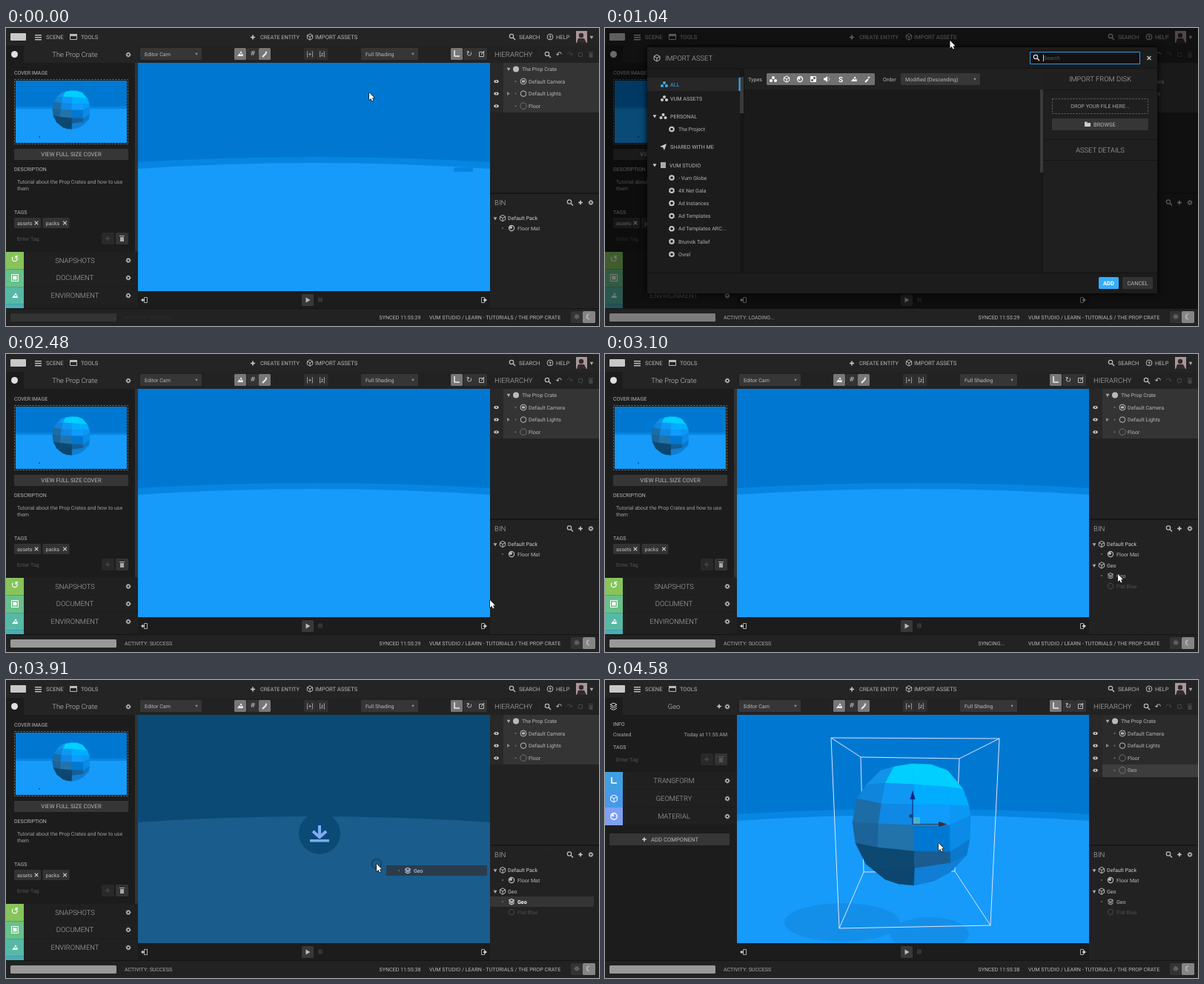
An HTML page with a canvas that plays this animation: 800 by 402 pixels, repeating every 5580 ms.

```html
<!DOCTYPE html>
<html lang="en">
<head>
<meta charset="utf-8">
<title>Scene editor</title>
<style>
html, body { margin: 0; width: 100%; height: 100%; overflow: hidden; background: #1c1c1c }
canvas { display: block }
</style>
</head>
<body>
<canvas id="stage" width="800" height="402"></canvas>
<script>
const g = document.getElementById('stage').getContext('2d');
const LOOP = 5580, TITLE = 'The Prop Crate';

// ---- drawing helpers ----
function rect(x, y, w, h, c) { g.fillStyle = c; g.fillRect(x, y, w, h); }
function round(x, y, w, h, c, r = 1.5) {
  g.fillStyle = c; g.beginPath(); g.roundRect(x, y, w, h, r); g.fill();
}
function box(x, y, w, h, c, dash = []) {
  g.strokeStyle = c; g.lineWidth = 1; g.setLineDash(dash);
  g.strokeRect(x + .5, y + .5, w - 1, h - 1); g.setLineDash([]);
}
function disc(x, y, r, c) { g.fillStyle = c; g.beginPath(); g.arc(x, y, r, 0, 7); g.fill(); }
function ring(x, y, r, c, w = 1) {
  g.strokeStyle = c; g.lineWidth = w; g.beginPath(); g.arc(x, y, r, 0, 7); g.stroke();
}
function trace(p) {
  g.beginPath();
  for (let i = 0; i < p.length; i += 2) g.lineTo(p[i], p[i + 1]);
}
function fill(p, c) { trace(p); g.fillStyle = c; g.fill(); }
function line(p, c, w = 1) { trace(p); g.strokeStyle = c; g.lineWidth = w; g.stroke(); }
function text(s, x, y, size = 7.1, c = '#b8b8b8', align = 'left', weight = 400) {
  g.font = `${weight} ${size}px Roboto, sans-serif`;
  g.textAlign = align; g.textBaseline = 'alphabetic'; g.fillStyle = c;
  g.fillText(s, x, y + size * .36);
}
function glyph(s, x, y, size = 8, c = '#c4c4c4') {
  g.font = `${size}px "DejaVu Sans", sans-serif`;
  g.textAlign = 'center'; g.textBaseline = 'middle'; g.fillStyle = c;
  g.fillText(s, x, y);
}
function plus(x, y, r = 3, c = '#ccc') {
  line([x - r, y, x + r, y], c, 1.6); line([x, y - r, x, y + r], c, 1.6);
}
function cross(x, y, r = 2.3, c = '#ccc') {
  line([x - r, y - r, x + r, y + r], c, 1.2); line([x - r, y + r, x + r, y - r], c, 1.2);
}
function lens(x, y, c = '#bbb') { ring(x - 1, y - 1, 2.7, c, 1.2); line([x + 1, y + 1, x + 4, y + 4], c, 1.4); }
function gear(x, y) { ring(x, y, 2, '#bbb', 1.4); g.setLineDash([1, 1.2]); ring(x, y, 3, '#bbb'); g.setLineDash([]); }
function down(x, y, c = '#aaa', r = 2.4) { fill([x - r, y - r * .7, x + r, y - r * .7, x, y + r], c); }
function trash(x, y, c) { rect(x - 2.5, y - 2, 5, 6, c); rect(x - 3.5, y - 4, 7, 1, c); }
function cube(x, y, c = '#bbb', r = 4.2) {
  const k = r * .87, h = r / 2;
  line([x, y - r, x + k, y - h, x + k, y + h, x, y + r, x - k, y + h, x - k, y - h, x, y - r], c);
  line([x - k, y - h, x, y, x + k, y - h], c); line([x, y, x, y + r], c);
}
function layers(x, y, c = '#bbb', r = 3.6) {
  line([x, y - r, x + r, y - r / 2, x, y, x - r, y - r / 2, x, y - r], c);
  for (const d of [0, r * .6]) line([x - r, y + d, x, y + r / 2 + d, x + r, y + d], c);
}
function folder(x, y, c = '#ccc') { rect(x - 4, y - 2, 8, 5, c); rect(x - 4, y - 3.5, 3.5, 2, c); }
function image(x, y, c = '#eee') { fill([x - 4, y + 3, x - 1, y - 1, x + 1, y + 1, x + 3, y - 1, x + 4, y + 3], c); disc(x + 1, y - 2, 1.2, c); }
function people(x, y, c = '#ccc') { for (const d of [-3, 0, 3]) disc(x + d, y + (d ? 2 : -2), 2, c); }
function select(s, x, w, y) {
  round(x, y, w, 16, '#363636'); text(s, x + 6, y + 8); down(x + w - 7, y + 8, '#999', 1.7);
}

// ---- 3D scene ----
const RINGS = [
  [372, 122, 390, 117, 414, 113, 440, 114, 462, 122],
  [352, 142, 378, 139, 418, 141, 460, 144, 483, 147],
  [340, 160, 373, 167, 417, 168, 466, 169, 491, 170],
  [334, 192, 369, 194, 416, 196, 465, 196, 493, 183],
  [338, 220, 368, 226, 417, 231, 466, 232, 492, 215],
  [352, 248, 374, 254, 418, 254, 466, 247, 488, 236],
  [378, 269, 396, 275, 417, 277, 444, 271, 466, 259]];
const FACETS = [
  '#1193ec', '#00cfff', '#00cfff', '#00cfff', '#0f86dc', '#1097f4', '#00adff', '#00adff',
  '#1d6ca6', '#0f88e6', '#0f9cfc', '#0d97f5', '#1b6399', '#2273a9', '#0078d2', '#0b8ae8',
  '#0d4871', '#0d4871', '#1a5c8f', '#0a78cc', '#0c466e', '#0c466e', '#0f7ed4', '#0f7ed4'];
function sphere(cx, cy, s) {
  const at = (r, c) => [cx + (RINGS[r][2 * c] - 414) * s, cy + (RINGS[r][2 * c + 1] - 195) * s];
  FACETS.forEach((c, i) => {
    const r = i >> 2, k = i % 4;
    const quad = [...at(r, k), ...at(r, k + 1), ...at(r + 1, k + 1), ...at(r + 1, k)];
    fill(quad, c); g.lineJoin = 'round'; line([...quad, quad[0], quad[1]], c, .6);
  });
}
function ground(edge, mid, c) {
  g.fillStyle = c; g.beginPath(); g.moveTo(178, edge);
  g.quadraticCurveTo(415, 2 * mid - edge, 653, edge);
  g.lineTo(653, 355); g.lineTo(178, 355); g.fill();
}
function shadow(x, y, rx, ry) {
  g.fillStyle = '#148fe9'; g.beginPath(); g.ellipse(x, y, rx, ry, 0, 0, 7); g.fill();
}
function viewport(t) {
  g.save(); g.beginPath(); g.rect(178, 47, 475, 308); g.clip();
  if (t >= 3910 && t < 4460) {
    rect(178, 47, 475, 308, '#0b4a74'); ground(192, 184, '#1a5c8c');
    disc(423, 207, 28, '#0b4a74');
    const c = '#7fabf5';
    line([423, 196, 423, 211], c, 4); line([414, 204, 423, 212, 432, 204], c, 4);
    rect(410, 215, 26, 3.5, c);
  } else {
    rect(178, 47, 475, 308, '#0078d2'); ground(181, 174, '#0686e2'); ground(190, 182, '#169bfa');
    if (t < 1040) rect(604, 188, 26, 6, '#0686e2');
    if (t >= 4580) geosphere();
  }
  g.restore();
}
function geosphere() {
  shadow(320, 327, 78, 26); shadow(438, 343, 53, 23);
  const front = [305, 78, 532, 79, 520, 331, 316, 335], back = [345, 104, 478, 106, 472, 258, 349, 259];
  const c = '#dfe4ff';
  line([...back, 345, 104], c);
  sphere(414, 195, 1);
  line([...front, 305, 78], c);
  for (let i = 0; i < 8; i += 2) line([front[i], front[i + 1], back[i], back[i + 1]], c);
  line([415, 194, 415, 158], '#14348c', 1.2); fill([415, 149, 411.5, 161, 418.5, 161], '#12277e');
  line([415, 194.5, 452, 194.5], '#4a2f35', 1.2); fill([462, 194.5, 450, 191, 450, 198], '#472a2b');
  rect(416, 185, 9, 9, '#4bb4c8'); disc(413, 183.5, 2.5, '#173f66');
}

// ---- editor chrome ----
function header(t) {
  rect(0, 0, 800, 24, '#242424');
  round(6, 7, 21, 10, '#c8c8c8', 1);
  for (const y of [9, 12, 15]) rect(39, y, 9, 1.4, '#c4c4c4');
  text('SCENE', 54, 12.5, 7.6);
  box(86, 8, 10, 8, '#bbb'); rect(86, 8, 10, 3, '#bbb'); text('TOOLS', 101, 12.5, 7.5);
  plus(333, 12.5); text('CREATE ENTITY', 343, 12.5, 7.4);
  const hot = t >= 770 && t < 1040 ? '#fff' : '#b8b8b8';
  cube(410, 12, hot); text('IMPORT ASSETS', 417, 12.5, 7.7, hot);
  lens(683, 12); text('SEARCH', 692, 12.5, 7.5);
  ring(734, 12, 3.9, '#bbb'); text('?', 734, 12.3, 6.5, '#ddd', 'center', 700);
  text('HELP', 742, 12.5, 7.5);
  rect(769, 4, 15, 16, '#a9979a'); disc(776, 10, 3.2, '#322a2c'); fill([770, 20, 772, 14, 780, 14, 783, 20], '#322a2c');
  down(790, 12.5, '#aaa');
}
function toolbar() {
  rect(178, 24, 475, 23, '#222');
  select('Editor Cam', 181, 83, 27); select('Full Shading', 479, 77, 27);
  for (const [x, c] of [[308, '#777'], [325, '#333'], [341, '#777'], [402, '#303030'], [418.5, '#303030'],
    [600, '#777'], [617, '#333'], [633, '#333']]) round(x, 27, 16, 16, c);
  image(316, 35); glyph('#', 333, 35, 9);
  line([346, 39, 351, 34], '#eee', 2); glyph('✦', 351, 33, 6, '#eee');
  text('[+]', 410, 35, 8, '#bbb', 'center'); text('[z]', 426.5, 35, 8, '#bbb', 'center');
  line([605, 30, 605, 38, 612, 38], '#eee', 1.5); glyph('↻', 625, 35, 10);
  box(638, 32, 7, 7, '#bbb'); line([641, 36, 645, 31], '#ccc');
}
function section(s, y) {
  rect(24, y - 12, 154, 23, '#202020'); text(s, 93, y, 9.4, '#b0b0b0', 'center', 300); gear(165, y);
}
function panelHead(s) {
  rect(0, 24, 178, 354, '#1c1c1c'); rect(24, 24, 154, 23, '#242424');
  text(s, 93, 36, 9.4, '#c8c8c8', 'center', 300);
  gear(165, 36);
}
function tagInput(y) {
  text('Enter Tag', 15, y, 7.1, '#555');
  round(129, y - 8, 17, 16, '#292929'); round(148, y - 8, 17, 16, '#333');
  plus(137, y, 3, '#444');
}
function chip(s, x, y, w) {
  round(x, y - 7, w, 14, '#333'); text(s, x + 4, y, 7, '#c0c0c0'); cross(x + w - 6, y);
}
function packPanel() {
  panelHead(TITLE);
  disc(11.5, 35.5, 4.5, '#e0e0e0');
  text('COVER IMAGE', 11, 60, 7);
  box(11, 69, 154, 88, '#777', [2, 2]);
  rect(13, 71, 150, 84, '#0078d2'); rect(13, 106, 150, 4, '#0686e2'); rect(13, 109, 150, 46, '#169bfa');
  sphere(88, 110.5, .315); rect(44, 146, 2, 2, '#0864ae');
  round(11, 163, 154, 15, '#363636'); text('VIEW FULL SIZE COVER', 88, 170.5, 7.7, '#b8b8b8', 'center');
  text('DESCRIPTION', 11, 190, 7);
  text('Tutorial about the Prop Crates and how to use', 15, 207.5, 7, '#a0a0a0');
  text('them', 15, 216, 7, '#a0a0a0');
  text('TAGS', 11, 248, 7);
  chip('assets', 11, 263, 36); chip('packs', 49.5, 263, 36);
  tagInput(284); trash(156.5, 284, '#aaa');
  rect(174, 47, 4, 331, '#151515'); rect(174, 47, 4, 262, '#333');
  section('SNAPSHOTS', 313.5); section('DOCUMENT', 337); section('ENVIRONMENT', 361); rect(24, 372, 154, 6, '#202020');
  ['#87c45c', '#68c08a', '#56b9a5', '#48aebc'].forEach((c, i) => rect(0, 302 + i * 23.6, 24, i < 3 ? 23.6 : 5.2, c));
  glyph('↺', 12, 313, 13, '#fff'); box(7, 332, 10, 10, '#fff'); rect(9.5, 334.5, 5, 5, '#fff'); image(12, 361, '#fff');
}
function geoPanel() {
  panelHead('Geo'); plus(154, 35.5, 2.8); layers(11.5, 35.5, '#ddd', 4.5);
  text('INFO', 11, 59, 7);
  text('Created', 11, 73, 7, '#a8a8a8'); text('Today at 11:55 AM', 165, 73, 7, '#a8a8a8', 'right');
  text('TAGS', 11, 90, 7); tagInput(107); trash(156.5, 107, '#555');
  section('TRANSFORM', 136); section('GEOMETRY', 160); section('MATERIAL', 184);
  ['#419fe0', '#4799e8', '#7f9ff2'].forEach((c, i) => rect(0, 124 + i * 24, 24, 24, c));
  line([9, 131, 9, 139, 16, 139], '#fff', 1.6); cube(12, 160, '#fff', 5); ring(12, 184, 4.2, '#fff', 1.4); disc(10.5, 182.5, 1.5, '#fff');
  round(6, 207, 162, 16, '#363636'); plus(53, 215, 2.8); text('ADD COMPONENT', 62, 215, 7.7);
}
function hierarchy(t) {
  rect(653, 24, 147, 200, '#222');
  text('HIERARCHY', 659, 36, 9.6, '#b8b8b8', 'left', 300);
  lens(731, 36); glyph('↶', 746, 36, 10); glyph('↷', 761, 36, 10, '#444');
  box(772, 33, 6, 6, '#444'); trash(789, 36, '#444');
  const done = t >= 4580;
  rect(653, 47, 18, done ? 84 : 67, '#282828'); rect(671, 47, 129, 67, done ? '#2b2b2b' : '#343434');
  if (done) rect(671, 114, 129, 17, '#3d3d3d');
  down(678, 55.5); disc(688, 55.5, 4, '#bbb'); text(TITLE, 696, 55.5);
  const rows = ['Default Camera', 'Default Lights', 'Floor'];
  if (done) rows.push('Geo');
  rows.forEach((s, i) => {
    const y = 72 + i * 16.6;
    g.fillStyle = '#ccc'; g.beginPath(); g.ellipse(661.5, y, 3.2, 2, 0, 0, 7); g.fill(); disc(661.5, y, 1, '#222');
    disc(687.5, y, 1, '#777'); text(s, 705, y);
    if (i) (i < 2 ? ring : layers)(698, y, i < 2 ? 3.8 : '#bbb', '#bbb');
    else { ring(698, y, 4, '#bbb'); rect(696, y - 1.5, 4, 3, '#bbb'); }
    if (i > 1) ring(698, y, 4.3, '#888', .7);
  });
  fill([676, 86, 676, 91, 680, 88.6], '#888');
}
function geoRow(x, y, c) {
  disc(x + 17, y, .9, '#777'); layers(x + 29, y, c); text('Geo', x + 37, y, 7.1, c, 'left', c === '#fff' ? 700 : 400);
}
function bin(t) {
  rect(653, 224, 147, 154, '#222'); rect(653, 222, 147, 2, '#171717');
  text('· · ·', 727, 228, 6, '#666', 'center');
  text('BIN', 659, 236, 9.6, '#b8b8b8', 'left', 300);
  lens(761, 235.5); plus(775, 235.5, 2.8); gear(789, 235.5);
  const material = y => { ring(682, y, 3.6, '#bbb', 1.2); disc(681, y - 1, 2, '#bbb'); };
  down(660, 257); cube(670, 256.5); text('Default Pack', 677, 256.5, 7.1, '#d0d0d0');
  disc(670, 270, .9, '#777'); material(270); text('Floor Mat', 690, 270);
  if (t < 2740) return;
  const drag = t >= 3640 && t < 3910;
  if (drag) rect(653, 278, 140, 43, '#343434');
  else if (t >= 3370 && t < 4460) rect(653, 292, 140, 14, '#353535');
  down(660, 285.5); cube(670, 285, drag ? '#777' : '#bbb'); text('Geo', 677, 285, 7.1, drag ? '#888' : '#c8c8c8');
  geoRow(653, 299, t >= 3370 && t < 4460 ? '#fff' : '#bbb');
  ring(682, 313, 3.6, '#444', 1.2); text('Flat Blue', 690, 313, 7.1, '#505050');
}
function footer(t) {
  rect(0, 379, 800, 23, '#222'); rect(0, 378, 800, 1, '#141414');
  round(6, 385, 143, 11, t < 1040 ? '#333' : t < 1160 ? '#7c7c7c' : '#999');
  const status = t < 1040 || t >= 1160 ? 'SUCCESS' : 'LOADING...';
  text('ACTIVITY: ' + status, 160, 390.5, 7.1, t < 1040 ? '#303030' : '#aaa');
  const sync = t < 2980 ? 'SYNCED 11:55:29' : t < 3250 ? 'SYNCING...' : 'SYNCED 11:55:38';
  text(sync, 503.5, 390.5);
  text('VUM STUDIO / LEARN - TUTORIALS / ' + TITLE.toUpperCase(), 571, 390.5, 7.2);
  round(762, 382, 16, 16, '#333'); round(778, 382, 17, 16, '#858585');
  glyph('☼', 770, 390, 10); glyph('☾', 786.5, 390, 10, '#fff');
}
function playbar() {
  rect(178, 355, 475, 23, '#1c1c1c');
  round(399, 359, 16, 16, '#383838'); fill([404.5, 363.5, 404.5, 370.5, 410.5, 367], '#bbb');
  rect(421, 363.5, 6, 6, '#343434');
  for (const [x, d] of [[187, -1], [644, 1]]) {
    box(x - 2 - d, 363, 5, 8, '#aaa'); line([x, 367, x + 4 * d, 367], '#ddd', 1.5);
    fill([x + 2 * d, 364.5, x + 5 * d, 367, x + 2 * d, 369.5], '#ccc');
  }
}

// ---- import dialog ----
const FIRST = ['- Vum Globe', '4X Net Gala', 'Ad Instances', 'Ad Templates', 'Ad Templates ARC...', 'Brunvik Tallef', 'Ovrel'];
const LATER = ['LEARN - Intro', 'LEARN - Tutorials', 'Tib Norvas', 'Bor Zep', 'Torvil Making Sk...', 'Velka - Ordrum',
  'Tinystall: The dRU...', 'Druffin', 'VALLEYS of T...', 'Dr Umber', 'Meadow Prop Set', 'Dagrunor 31', 'QVD',
  'Client Trials (Lo...', 'PRINTSCREENS 1...'];
function listItem(s, y, c = '#b0b0b0') { ring(90, y, 2.8, c === '#b0b0b0' ? '#c8c8c8' : c, 2); text(s, 99, y, 7.1, c); }
function activeRow(y) { rect(57, y - 9, 125, 18, '#272727'); rect(180.5, y - 9, 2, 18, '#35aefc'); }
function sidebar(scrolled) {
  const blue = '#38aefc';
  rect(182, 54, 5, 276, '#171717');
  if (scrolled) {
    rect(182, 180, 5, 48, '#3a3a3a'); activeRow(91);
    LATER.forEach((s, i) => listItem(s, 73.7 + i * 17.18, i === 1 ? blue : undefined));
    return;
  }
  rect(182, 66, 5, 49, '#3a3a3a'); activeRow(76);
  people(80, 76, blue); text('ALL', 88, 76.5, 7.2, blue);
  people(80, 95); text('VUM ASSETS', 88, 95.5, 7.2);
  down(67, 119, '#ccc'); people(78.5, 119); text('PERSONAL', 88, 119.5, 7.2);
  listItem('The Project', 136.5);
  fill([74, 160, 83, 156, 80, 165, 78, 161], '#ccc'); text('SHARED WITH ME', 88, 160.5, 7.2);
  down(67, 185, '#ccc'); rect(75, 181, 7, 8, '#aaa'); text('VUM STUDIO', 87, 185, 7.2);
  FIRST.forEach((s, i) => listItem(s, 202 + i * 17.2));
}
function tile(x, name, picked, paint) {
  paint();
  rect(x, 132, 71, 20.5, picked ? '#36b1fb' : '#2a2a2a');
  text(name, x + 35.5, 143.5, 7.2, picked ? '#fff' : '#aaa', 'center', picked ? 700 : 400);
  rect(x + 54, 93, 17, 17, '#7f9df3'); cube(x + 62.5, 101.5, '#fff', 4.5);
}
function assets(picked) {
  tile(196, 'GEO', picked, () => {
    rect(196, 92, 71, 40, '#0078d2'); rect(196, 114, 71, 18, '#169bfa'); sphere(231, 113.5, .15);
  });
  tile(273.5, 'RAYCASTVEHI', false, () => {
    rect(273.5, 92, 71, 40, '#4b4b4b'); rect(273.5, 108, 71, 24, '#777');
    fill([292, 124, 300, 112, 326, 118, 320, 132, 300, 132], '#999');
    fill([296, 117, 303, 112, 322, 107, 326, 113, 308, 124], '#69a85e');
    for (const [x, y] of [[299, 121], [309, 125], [322, 117], [307, 110]]) disc(x, y, 2.5, '#222');
    fill([308, 113, 315, 111, 316, 116, 310, 118], '#d7e6c8');
  });
}
function details() {
  text('NAME', 603, 195, 7.1); rect(603, 201, 126, 14, '#131313'); text('Geo', 606.5, 208, 7, '#aaa');
  text('DESCRIPTION', 603, 226, 7.1); rect(603, 231, 126, 59, '#131313'); text('A geosphere', 606.5, 238.5, 7, '#aaa');
  text('TAGS', 603, 300, 7.1); chip('geosphere', 603, 313.5, 48);
  rect(603, 326, 88, 4, '#131313'); rect(693, 326, 16, 4, '#333'); rect(712, 326, 17, 4, '#333');
  rect(740, 178, 5, 152, '#171717'); rect(740, 178, 5, 72, '#3a3a3a');
}
function dialog(t) {
  rect(0, 0, 800, 378, 'rgba(0,0,0,.52)');
  g.save(); g.shadowColor = '#000'; g.shadowBlur = 8; rect(57, 26, 688, 332, '#1c1c1c'); g.restore();
  cube(70, 40.5, '#bbb', 4.5); text('IMPORT ASSET', 81, 40.5, 9.4, '#b8b8b8', 'left', 300);
  round(573, 32, 149, 17, '#111', 2); box(573, 32, 149, 17, '#2c9ae6'); lens(582, 40, '#ddd');
  text('Search', 592, 40.5, 7.2, '#5a5a5a');
  if (t < 1430 || t >= 1560) rect(591, 36, 1, 9, '#ccc');
  cross(734, 40.5, 2.5);
  sidebar(t >= 1160);
  rect(187, 54, 404, 29, '#202020'); rect(187, 83, 400, 247, '#1a1a1a');
  text('Types', 193, 69, 7.2); round(218, 61, 146, 16, '#707070');
  people(227, 69, '#fff'); cube(245, 69, '#fff'); ring(263, 69, 3.5, '#fff', 1.3); disc(262, 68, 1.6, '#fff');
  box(277, 65, 8, 8, '#fff'); rect(277, 65, 4, 4, '#fff'); rect(281, 69, 4, 4, '#fff');
  fill([295, 67.5, 297, 67.5, 300, 65, 300, 73, 297, 70.5, 295, 70.5], '#fff'); glyph(')', 302, 69, 6, '#fff');
  text('S', 318, 69, 10, '#fff', 'center', 700); image(336, 69, '#fff');
  line([351, 73, 355, 69], '#fff', 2); glyph('✦', 356, 67, 6, '#fff');
  text('Order', 375, 69, 7.2); select('Modified (Descending)', 399, 107, 61);
  rect(587, 83, 4, 247, '#171717'); rect(587, 83, 4, 112, '#3a3a3a');
  rect(591, 54, 154, 276, '#1f1f1f');
  for (const y of [83, 150, 178]) rect(591, y, 154, 1, '#151515');
  text('IMPORT FROM DISK', 668, 69, 9.4, '#b8b8b8', 'center', 300);
  box(603, 95, 130, 21, '#666', [2, 2]); text('DROP YOUR FILE HERE...', 668, 105.5, 7.2, '#aaa', 'center');
  round(603, 122, 130, 16, '#363636'); folder(651, 130); text('BROWSE', 659, 130.5, 7.5);
  text('ASSET DETAILS', 668, 165, 9.4, '#b8b8b8', 'center', 300);
  if (t >= 1160) assets(t >= 1290);
  if (t >= 1290) details();
  rect(57, 54, 688, 1, '#141414'); rect(57, 330, 688, 1, '#111'); rect(187, 54, 1, 276, '#141414');
  round(666, 336, 27, 16, t >= 1980 ? '#57bfce' : '#35aefc');
  text('ADD', 679.5, 344.5, 7.6, '#fff', 'center', 700);
  round(698, 336, 41, 16, '#333'); text('CANCEL', 718.5, 344.5, 7.4, '#b8b8b8', 'center');
}

// ---- pointer: time, x, y ----
const POINTER = [
  [0, 490, 87], [500, 478, 52], [620, 468, 24], [770, 466, 20], [890, 465.5, 17], [1160, 232, 128],
  [1290, 562, 228], [1430, 630, 268], [1560, 684, 294], [1700, 682, 320], [1830, 680, 342], [1980, 682, 349],
  [2480, 653, 332], [2620, 662, 322], [2740, 672, 313], [2860, 682, 304], [2980, 690, 299], [3100, 692, 297],
  [3640, 640, 290], [3760, 587, 280], [3910, 500, 248], [4030, 420, 220], [4180, 436, 220], [4310, 450, 220]];
function pointer(t) {
  const [, x, y] = POINTER.findLast(p => t >= p[0]);
  if (t >= 3640 && t < 4180) {
    g.save(); g.beginPath(); g.rect(178, 47, 475, 308); g.clip();
    rect(x + 13, y + 2, 136, 14, 'rgba(45,55,65,.85)'); geoRow(x + 13, y + 9, '#e4dcff');
    g.restore(); ring(x, y, 6.5, '#1b3550', 1.1);
  }
  g.lineJoin = 'round';
  const hand = [-1, 0, 1, 0, 1, 5, 5, 6, 5, 10, 3, 14, -2, 14, -5, 9, -4, 8, -1, 10, -1, 0];
  const arrow = [0, 0, 0, 10, 2.3, 8, 4, 11.5, 5.5, 10.8, 4, 7.3, 7, 7.2, 0, 0];
  const shape = (t >= 1980 && t < 2480 ? hand : arrow).map((v, i) => v + (i % 2 ? y : x));
  line(shape, '#111', 1.4); fill(shape, '#fff');
}

function draw(t) {
  g.textRendering = 'geometricPrecision';
  rect(0, 0, 800, 402, '#1c1c1c');
  header(t); toolbar(); viewport(t); playbar();
  (t >= 4580 ? geoPanel : packPanel)();
  hierarchy(t); bin(t);
  if (t >= 1040 && t < 2480) dialog(t);
  footer(t); pointer(t);
}
const start = performance.now();
function tick() {
  draw((performance.now() - start) % LOOP);
  requestAnimationFrame(tick);
}
tick();
</script>
</body>
</html>
```
